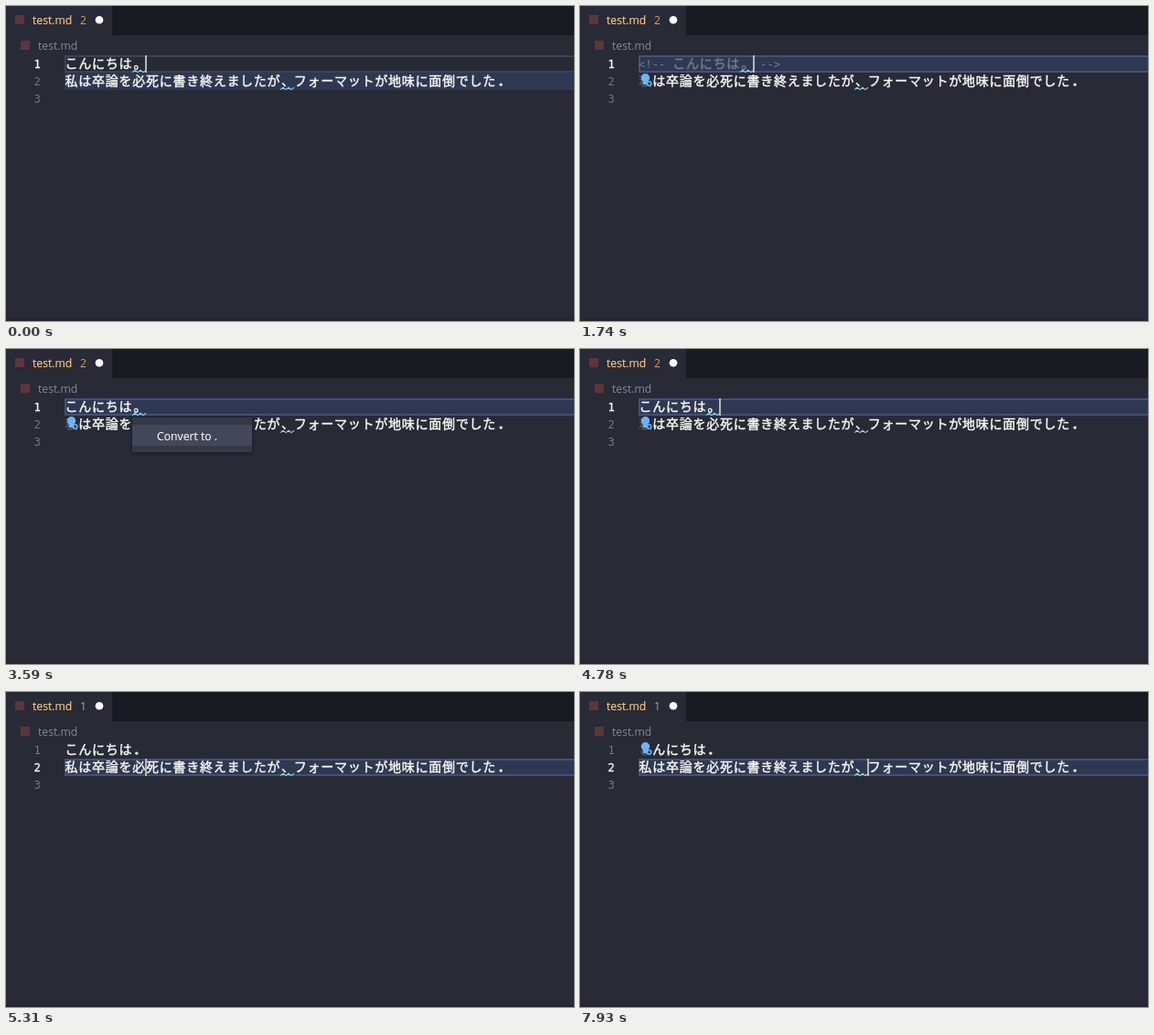
These frames come from a looping animation (621x345 px, 8000 ms). An HTML page:

```html
<!DOCTYPE html>
<html lang="ja">
<head>
<meta charset="utf-8">
<style>
html, body { margin: 0; width: 100%; height: 100%; overflow: hidden; background: #282a36; }
svg { display: block; width: 621px; height: 345px; }
text { white-space: pre; }
.ui { font: 12.2px "Open Sans", "Noto Sans", sans-serif; }
.ja { font: 14px "Noto Sans CJK JP", "Noto Sans CJK", sans-serif; letter-spacing: .74px; stroke: currentColor; stroke-width: .45px; }
.stop { stroke-width: 1.2px; }
.mono { font: 12.24px "DejaVu Sans Mono", monospace; }
.wave { fill: none; stroke: #8fcfe6; stroke-width: 1.1px; }
</style>
</head>
<body>
<svg viewBox="0 0 621 345">
  <defs>
    <path id="wave" class="wave" d="M0 18.6l3-2.4 3 2.4 3-2.4 3 2.4 3-2.4"/>
    <filter id="shadow" x="-10%" y="-30%" width="120%" height="160%">
      <feDropShadow dx="0" dy="1" stdDeviation="2" flood-color="#000" flood-opacity=".45"/>
    </filter>
  </defs>

  <rect width="621" height="345" fill="#282a36"/>
  <rect x="116" width="505" height="32" fill="#191a21"/>
  <rect y="342" width="621" height="3" fill="#272330"/>

  <g class="ui">
    <rect x="10" y="10" width="10" height="10" fill="#5c3638"/>
    <text x="29" y="20" fill="#ffc888" stroke="#ffc888" stroke-width=".15">test.md</text>
    <text id="count" x="81" y="19.5" fill="#d99f60"></text>
    <circle cx="102" cy="15.3" r="4.3" fill="#fff"/>
    <rect x="16" y="38" width="10" height="10" fill="#5c3638"/>
    <text x="35" y="48" fill="#858896">test.md</text>
  </g>

  <rect id="fill" x="64" width="557" height="19" fill="#2f3852"/>
  <path id="edge" fill="none" stroke-width="2" d="M623 1H65V18H623"/>

  <g id="numbers" class="mono">
    <text x="30.5" y="68">1</text>
    <text x="30.5" y="87">2</text>
    <text x="30.5" y="106">3</text>
  </g>

  <g id="hello" class="ja">
    <text x="64.5" y="67.6">こんにちは</text>
    <text id="mark" x="139.6" y="68"></text>
    <use id="warn" href="#wave" x="138" y="54"/>
  </g>
  <g id="tags" class="mono" fill="#777a86">
    <text x="64" y="67.6">&lt;!--</text>
    <text x="197" y="67.6">--&gt;</text>
  </g>
  <g class="ja" fill="#f8f8f2" color="#f8f8f2">
    <text x="64.5" y="86.7">私は卒論を必死に書き終えましたが<tspan dx="1">、</tspan><tspan dx="-1">フォーマットが地味に面倒でした</tspan><tspan class="stop" dx="1.8">．</tspan></text>
  </g>
  <use href="#wave" x="300" y="73"/>

  <g id="bulb">
    <rect id="veil" x="64" y="1" width="15" height="15" opacity=".76"/>
    <circle cx="71.5" cy="5.7" r="4.7" fill="#6cb4f8"/>
    <path d="M69 9h5v4h-5z" fill="#6cb4f8"/>
    <circle cx="75.7" cy="12" r="2.2" fill="#2b3145" stroke="#6cb4f8" stroke-width="1.5"/>
  </g>
  <rect id="caret" width="2" height="19" fill="#b9bab2"/>

  <g id="menu" class="ui">
    <rect x="138" y="75" width="131" height="38" fill="#343746" filter="url(#shadow)"/>
    <rect x="138" y="83" width="131" height="23" fill="#44475a"/>
    <text x="165" y="100" fill="#f8f8f2" stroke="#f8f8f2" stroke-width=".15">Convert to .</text>
  </g>
</svg>
<script>
const LOOP = 8000, CELL = 14.74, LEFT = 64;
const $ = id => document.getElementById(id);
const rowY = row => 54 + 19 * row;
const show = (id, on) => $(id).setAttribute("display", on ? "inline" : "none");
const move = (id, x, y) => $(id).setAttribute("transform", `translate(${x} ${y})`);

// Each step changes part of the editor state; bulb is a row, -1 hides it.
const steps = [
  [0, { line: 0, fill: 1, col: 6, caret: true, bulb: -1, comment: false, menu: false, fixed: false, count: 2 }],
  [70, { fill: 0 }],
  [270, { bulb: 1 }],
  [530, { caret: false }],
  [1010, { caret: true }],
  [1540, { caret: false }],
  [1740, { caret: true, comment: true, col: 8.5 }],
  [2200, { comment: false, col: 6 }],
  [2730, { caret: false }],
  [3190, { caret: true }],
  [3590, { caret: false, menu: true }],
  [4780, { caret: true, menu: false }],
  [4840, { fixed: true, bulb: -1 }],
  [4910, { count: 1 }],
  [5310, { line: 1, fill: 1 }],
  [5570, { col: 7 }],
  [5700, { col: 8 }],
  [5900, { col: 9 }],
  [6160, { col: 10 }],
  [6290, { col: 11 }],
  [6420, { col: 15 }],
  [6550, { col: 20 }],
  [6620, { col: 23 }],
  [6950, { col: 17 }],
  [7210, { bulb: 0 }],
  [7470, { caret: false }],
  [7930, { caret: true }]
];

function draw(now) {
  const time = now % LOOP;
  const s = Object.assign({}, ...steps.filter(([at]) => at <= time).map(step => step[1]));
  const ink = s.comment ? "#777a86" : "#f8f8f2";

  $("count").textContent = s.count;
  $("fill").setAttribute("y", rowY(s.fill));
  move("edge", 0, rowY(s.line));
  $("edge").setAttribute("stroke", s.fill === s.line ? "#465073" : "#3f4155");
  [...$("numbers").children].forEach((n, i) => {
    n.setAttribute("fill", i === s.line ? "#f8f8f2" : "#747784");
    n.setAttribute("stroke", i === s.line ? "#f8f8f2" : "none");
    n.setAttribute("stroke-width", .3);
  });

  move("hello", s.comment ? 2.5 * CELL : 0, 0);
  $("hello").setAttribute("fill", ink);
  $("hello").style.color = ink;
  $("mark").textContent = s.fixed ? "．" : "。";
  $("mark").classList.toggle("stop", s.fixed);
  show("warn", !s.fixed);
  show("tags", s.comment);

  show("bulb", s.bulb >= 0);
  move("bulb", 0, rowY(s.bulb));
  $("veil").setAttribute("fill", s.bulb === s.line ? "#2f3852" : "#282a36");
  show("caret", s.caret);
  move("caret", Math.floor(LEFT + CELL * s.col), rowY(s.line));
  show("menu", s.menu);
}

function tick() {
  draw(performance.now());
  requestAnimationFrame(tick);
}
tick();
</script>
</body>
</html>
```
